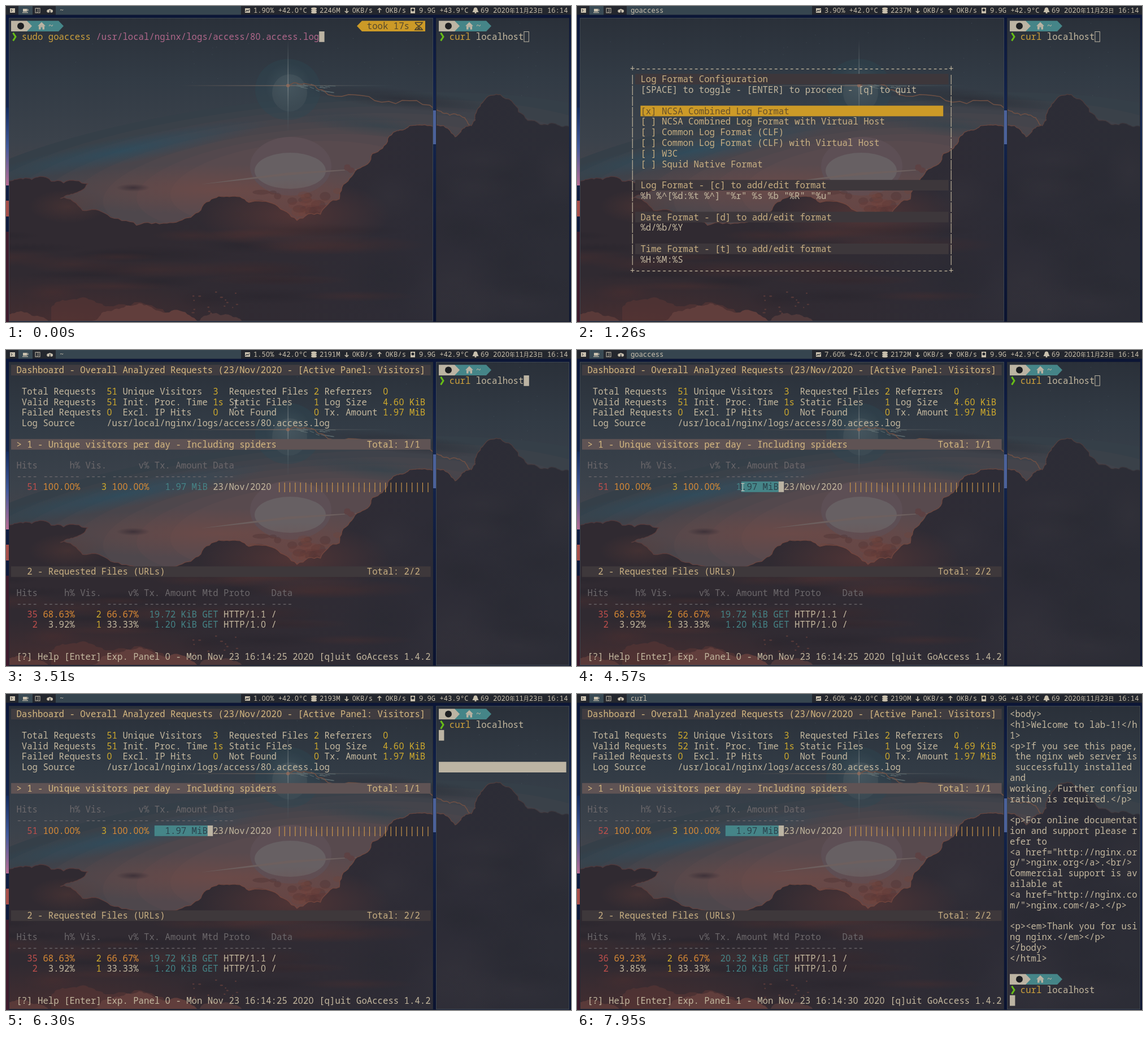
An HTML page with a canvas for the animation above (8 s loop, 1000 by 560 pixels).

```html
<!DOCTYPE html>
<html lang="en">
<head>
<meta charset="utf-8">
<title>Log analyzer session</title>
<style>
html, body { margin: 0; height: 100%; overflow: hidden; background: #0a1433; }
canvas { display: block; width: 100vw; height: 100vh; }
</style>
</head>
<body>
<canvas id="stage" width="1000" height="560"></canvas>
<script>
const LOOP = 8000, CW = 9.4, RH = 18.8, TOP = 26.2, LEFT = 9, RIGHT = 766;
const FG = '#c4b89f', LIGHT = '#bcb4a3', YELLOW = '#cc9a27', TEAL = '#458588', RED = '#bf4f4c', ORANGE = '#d98a35',
  GOLD = '#cfaa2c', GREY = '#6c686b', TITLE = '#d6b981', TAN = '#c9b083', PINK = '#b0678a', CMD = '#cda03c';
let g = document.getElementById('stage').getContext('2d');

// ---------- drawing helpers ----------
function rect(x, y, w, h, color) { g.fillStyle = color; g.fillRect(x, y, w, h); }
function trace(p) {
  g.beginPath();
  p.forEach(([x, y]) => g.lineTo(x, y));
}
function poly(color, ...p) { trace(p); g.fillStyle = color; g.fill(); }
function line(color, width, ...p) {
  trace(p);
  g.strokeStyle = color;
  g.lineWidth = width;
  g.stroke();
}
function oval(x, y, rx, ry, color, turn = 0) {
  g.fillStyle = color;
  g.beginPath();
  g.ellipse(x, y, rx, ry, turn, 0, 7);
  g.fill();
}
function gradient(box, ...colors) {
  const f = box.length > 4 ? g.createRadialGradient(...box) : g.createLinearGradient(...box);
  colors.forEach((c, i) => f.addColorStop(i / (colors.length - 1), c));
  return f;
}
function glow(x, y, rx, ry, rgb, alpha, turn = 0) {
  g.save();
  g.translate(x, y);
  g.rotate(turn);
  g.scale(1, ry / rx);
  oval(0, 0, rx, rx, gradient([0, 0, 0, 0, 0, rx], `rgba(${rgb},${alpha})`, `rgba(${rgb},0)`));
  g.restore();
}
// Monospaced text with an open zero.
function text(s, x, y, color, size = CW / 0.6) {
  g.fillStyle = color;
  [...s].forEach((c, i) => {
    if (c === ' ') return;
    const zero = c === '0';
    g.font = size + (zero ? 'px "Noto Sans", sans-serif' : 'px "Noto Sans Mono", monospace');
    g.fillText(c, x + size * (i * 0.6 + (zero ? 0.014 : 0)), y);
  });
}
const rowY = r => TOP + r * RH;
function put(s, col, row, color = FG, x0 = LEFT) { text(s, x0 + col * CW, rowY(row) + 14.9, color); }
function cells(col, row, n, color, x0 = LEFT) { rect(x0 + col * CW, rowY(row), n * CW, RH, color); }
function cursor(col, row, x0, solid = true) {
  if (solid) return cells(col, row, 1, LIGHT, x0);
  g.strokeStyle = LIGHT;
  g.lineWidth = 1;
  g.strokeRect(x0 + col * CW + 0.5, rowY(row) + 0.5, CW - 1, RH - 1);
}

// ---------- wallpaper ----------
let seed = 7;
const rnd = () => (seed = seed * 16807 % 2147483647) / 2147483647;
const mix = (a, b, k) => `rgb(${a.map((v, i) => v + (b[i] - v) * k)})`;
// Roughens a polyline by repeated midpoint displacement.
function ridge(p, rough = 0.3) {
  for (let round = 0; round < 4; round++) {
    p = p.flatMap(([x, y], i) => {
      if (!i) return [[x, y]];
      const [px, py] = p[i - 1], d = (rnd() - 0.4) * rough;
      return [[(px + x) / 2 + (y - py) * d, (py + y) / 2 - (x - px) * d], [x, y]];
    });
  }
  return p;
}
function cloud(p, fill, rim) {
  const edge = ridge(p);
  poly(fill, ...edge, [p[p.length - 1][0], 560], [p[0][0], 560]);
  if (rim) line(rim, 1.2, ...edge);
}
function paintScene() {
  rect(0, 0, 1000, 560, gradient([0, 20, 0, 350], '#2a3039', '#323b45', '#3b424b', '#4c4549'));
  for (let i = 0; i < 40; i++) rect(rnd() * 1000, 22 + rnd() * 150, 1, 1, '#444e58');
  for (let i = 0; i < 8; i++) oval(510, 315, 640 - 60 * i, 150 - 11 * i, mix([53, 63, 72], [88, 74, 78], i / 7), -0.1);
  glow(210, 256, 260, 24, '40,80,100', 0.65, -0.19);
  glow(660, 212, 160, 20, '48,66,76', 0.6, 0.12);
  glow(380, 325, 340, 45, '118,74,68', 0.6);

  oval(504, 284, 72, 52, '#5d4f55');
  oval(503, 292, 63, 32, '#676063');
  poly('#6d605f', [345, 316], [500, 295], [640, 288], [500, 300]);

  oval(499, 148, 58, 54, 'rgba(44,72,85,.35)');
  oval(502, 154, 31, 33, '#3c4a53');
  glow(499, 141, 40, 40, '90,112,120', 0.3);
  rect(498.5, 60, 1.4, 165, gradient([0, 60, 0, 225], 'rgba(120,128,130,0)', '#777f82', 'rgba(80,100,108,0)'));
  rect(310, 140.5, 380, 1.2, gradient([310, 0, 690, 0], 'rgba(140,115,100,0)', '#806d64', 'rgba(76,96,104,0)'));
  glow(700, 165, 170, 18, '44,46,55', 0.8, 0.1);
  for (let i = 0; i < 18; i++) {
    const x = 510 + rnd() * 60, y = 138 + rnd() * (x - 490) * 0.2;
    line('#5d6c70', 1, [x, y], [x + 6 + rnd() * 12, y + rnd() * 3]);
  }
  line('#6f5044', 1.5, ...ridge([[500, 141], [570, 157], [760, 184], [812, 198], [822, 214], [795, 233]]));
  oval(499, 141, 3, 3, '#8a6a5c');

  for (let i = 0; i < 45; i++) {
    oval(435 + rnd() * 165, 328 + rnd() * 45, 6 + rnd() * 15, 3 + rnd() * 6, i % 2 ? 'rgba(70,47,50,.4)' : 'rgba(112,68,60,.35)');
  }
  for (let i = 0; i < 7; i++) oval(602 + rnd() * 14, 284 + rnd() * 10, 5, 4, '#5d4244');
  glow(225, 322, 30, 7, '62,50,57', 1);
  const ground = [[0, 309], [60, 302], [145, 315], [96, 341], [180, 370], [285, 385], [360, 346], [430, 348], [515, 380], [590, 342],
    [640, 280], [690, 222], [727, 211], [795, 232], [824, 212], [832, 190], [875, 157], [945, 210], [1000, 216]];
  cloud(ground, gradient([0, 0, 1000, 0], '#302a31', '#302a31', '#302b33', '#2d2c36', '#2c2d36'),
    gradient([0, 0, 1000, 0], '#4b363b', '#68443f', '#75493f', '#6b473f', '#33323a'));
  for (let i = 0; i < 28; i++) glow(rnd() * 640, 390 + rnd() * 140, 50 + rnd() * 100, 8 + rnd() * 10, i % 2 ? '38,35,43' : '72,46,47', 0.45);
  for (let i = 0; i < 16; i++) glow(660 + rnd() * 340, 270 + rnd() * 270, 40 + rnd() * 60, 30 + rnd() * 40, i % 2 ? '39,40,48' : '54,52,60', 0.4);
  glow(510, 370, 170, 65, '120,64,56', 0.45);
  glow(110, 355, 70, 30, '96,60,54', 0.4);
  glow(100, 560, 330, 85, '92,50,48', 0.5);
  cloud([[80, 534], [125, 520], [180, 532], [330, 560]], 'rgba(92,56,54,.55)');
  cloud([[0, 549], [35, 543], [75, 560]], '#5a3a39');
  cloud([[150, 560], [200, 537], [270, 540], [340, 560]], '#613e3c');
  cloud([[340, 560], [380, 548], [420, 560]], '#4f393b');
  for (let i = 0; i < 16; i++) oval(330 + rnd() * 80, 505 + rnd() * 40, 1 + rnd() * 2, 1.2, '#563a39');
}
function paintGaps() {
  const night = gradient([0, 15, 0, 560], '#0b1638', '#14264f', '#0f1a3c', '#0b1330');
  rect(0, 15, 1000, 6, '#0c1636');
  rect(0, 559, 1000, 1, '#151a30');
  [0, 756, 997].forEach(x => rect(x, 15, 5, 544, night));
  rect(756, 185, 5, 60, '#4b619a');
  rect(0, 180, 5, 138, gradient([0, 180, 0, 318], '#122a5c', '#41599a', '#b56c93'));
  rect(0, 345, 5, 28, '#a64e4a');
  rect(0, 400, 5, 160, '#3d1b2d');
}

// ---------- status bar ----------
const STATS = ['1.90% 2246M', '3.90% 2237M', '5.20% 2204M', '1.50% 2191M', '7.60% 2172M', '1.00% 2193M', '2.60% 2190M'];
const BAR_FG = '#c9c0ae', BAR_BG = '#24272e';
function arrow(x, dir) {
  line(BAR_FG, 1.6, [x, 8 - 4 * dir], [x, 8 + 4 * dir]);
  line(BAR_FG, 1.6, [x - 3.2, 8 + dir], [x, 8 + 4 * dir], [x + 3.2, 8 + dir]);
}
function bar(t, title) {
  const k = Math.floor((t - 820) / 1237) + 1, [cpu, mem] = STATS[k].split(' ');
  const temp = k > 0 && k < 5 ? '42.9' : '43.9';
  const say = (s, x) => text(s, x, 12.3, BAR_FG, 12.15);
  rect(0, 0, 1000, 15.5, BAR_BG);
  rect(22, 0, 25, 15.5, '#394a54');
  rect(88, 0, 328, 15.5, '#36454f');
  rect(7, 4, 9, 8, BAR_FG);
  line(BAR_BG, 1, [9, 6], [11, 8], [9, 10]);
  rect(30, 5, 7, 5, BAR_FG);
  rect(29, 11, 10, 1.2, BAR_FG);
  line(BAR_FG, 1, [37, 6], [39, 6], [39, 8.5], [37, 8.5]);
  g.strokeRect(52, 4, 8, 8);
  text('3', 53.6, 11, BAR_FG, 8);
  for (let i = 0; i < 3; i++) oval(75 + 2.6 * i, 9 - i % 2, 2.8, 2.8, BAR_FG);
  rect(77, 7.5, 1.4, 4, BAR_BG);
  say(title, 95);

  rect(423, 4, 9, 8, BAR_FG);
  line(BAR_BG, 1.1, [424, 10], [426.5, 7.5], [428.5, 9], [431, 6]);
  say(cpu + ' +42.0°C', 438);
  for (let i = 0; i < 3; i++) oval(545, 4.5 + 3.4 * i, 5, 2, BAR_FG);
  say(mem, 555);
  arrow(603, 1);
  say('0KB/s', 612.5);
  arrow(661, -1);
  say('0KB/s', 671.5);
  rect(716, 3, 8, 10, BAR_FG);
  oval(720, 7, 2.5, 2.5, BAR_BG);
  say(`9.9G +${temp}°C`, 731);
  oval(831, 6, 3.3, 3.6, BAR_FG);
  poly(BAR_FG, [827.7, 6], [834.3, 6], [836.5, 11], [825.5, 11]);
  oval(831, 12, 1.6, 1.3, BAR_FG);
  say('69', 840);
  let x = 862;
  for (const part of ['2020', '年', '11', '月', '23', '日']) {
    if (part < 'a') { say(part, x); x += part.length * 7.29; continue; }
    g.font = '10px "Noto Sans CJK JP", "Noto Sans CJK SC", sans-serif';
    g.fillText(part, x, 12);
    x += 10;
  }
  say('16:14', 958);
}

// ---------- shell ----------
function flag(color, x, y, w) { poly(color, [x, y], [x + w, y], [x + w + 9, y + RH / 2], [x + w, y + RH], [x, y + RH]); }
function prompt(x, row) {
  const y = rowY(row), m = y + RH / 2;
  flag(TEAL, x + 28, y, 56);
  flag(LIGHT, x, y, 28);
  oval(x + 17, m, 6, 6, '#1d1f22');
  poly(LIGHT, [x + 47, m], [x + 54, m - 7], [x + 61, m]);
  rect(x + 49, m, 3.5, 6, LIGHT);
  rect(x + 55.5, m, 3.5, 6, LIGHT);
  rect(x + 49, m, 10, 2, LIGHT);
  put('~', 7, row, LIGHT, x);
  line('#67bd17', 3, [x + 3.5, m + 12], [x + 8, m + 19], [x + 3.5, m + 26]);
}
function curl(row) {
  put('curl', 2, row, CMD, RIGHT);
  put('localhost', 7, row, FG, RIGHT);
}
const LOG = '/usr/local/nginx/logs/access/80.access.log';
function shell(entered) {
  const y = rowY(0), ink = '#4b412c';
  prompt(LEFT, 0);
  poly(YELLOW, [621, y + RH / 2], [630, y], [742, y], [742, y + RH], [630, y + RH]);
  put('took 17s', 67, 0, '#54482e');
  line(ink, 1.6, [724, y + 3], [737, y + 3], [735, y + 6], [726, y + 13], [724, y + 16], [737, y + 16], [735, y + 13], [726, y + 6], [724, y + 3]);
  poly(ink, [727, y + 15], [730.5, y + 11], [734, y + 15]);
  put('sudo goaccess', 2, 1, CMD);
  put(LOG, 16, 1, PINK);
  if (entered) cursor(0, 2, LEFT);
  else cursor(58, 1, LEFT);
}

// ---------- log format form ----------
const FORMATS = ['NCSA Combined Log Format', 'NCSA Combined Log Format with Virtual Host', 'Common Log Format (CLF)',
  'Common Log Format (CLF) with Virtual Host', 'W3C', 'Squid Native Format'];
const FIELDS = [['Log Format - [c]', '%h %^[%d:%t %^] "%r" %s %b "%R" "%u"'], ['Date Format - [d]', '%d/%b/%Y'],
  ['Time Format - [t]', '%H:%M:%S']];
function form(picked) {
  const rule = '+' + '-'.repeat(59) + '+';
  put(rule, 9, 4);
  put(rule, 9, 23);
  for (let r = 5; r < 23; r++) put('|' + ' '.repeat(59) + '|', 9, r);
  const head = (s, r) => { cells(10, r, 59, '#3d373b'); put(s, 11, r, TAN); };
  head('Log Format Configuration', 5);
  put('[SPACE] to toggle - [ENTER] to proceed - [q] to quit', 11, 6);
  cells(11, 8, 57, YELLOW);
  FORMATS.forEach((s, i) => put((i || !picked ? '[ ] ' : '[x] ') + s, 11, 8 + i, i ? TAN : '#66502b'));
  FIELDS.forEach(([name, value], i) => {
    head(name + ' to add/edit format', 15 + 3 * i);
    if (picked) put(value, 11, 16 + 3 * i);
  });
}

// ---------- dashboard ----------
// Each stat column: label column, value column, then label and value per row.
const summary = (n, size) => [
  [2, 18, 'Total Requests', n, 'Valid Requests', n, 'Failed Requests', '0'],
  [21, 38, 'Unique Visitors', '3', 'Init. Proc. Time', '1s', 'Excl. IP Hits', '0'],
  [41, 57, 'Requested Files', '2', 'Static Files', '1', 'Not Found', '0'],
  [59, 70, 'Referrers', '0', 'Log Size', size, 'Tx. Amount', '1.97 MiB']];
function panel(row, title, total, color, back, heads, rules) {
  cells(0, row, 79, back);
  put(title, 1, row, color);
  put('Total: ' + total, 67, row, color);
  put(heads, 1, row + 2, GREY);
  put(rules, 1, row + 3, GREY);
}
function request(row, hits, share, visits, part, color, size, proto) {
  put(hits, 3, row, RED);
  put(share, 6, row, color);
  put(visits, 16, row, GOLD);
  put(part, 18, row, color);
  put(size + ' GET', 26, row, TEAL);
  put(proto + ' /', 40, row);
}
function dashboard(late, selected) {
  const n = late ? '52' : '51';
  cells(0, 0, 79, '#403c40');
  put('Dashboard - Overall Analyzed Requests (23/Nov/2020 - [Active Panel: Visitors]', 1, 0, TITLE);
  for (const [labelCol, valueCol, ...items] of summary(n, late ? '4.69 KiB' : '4.60 KiB')) {
    items.forEach((s, i) => put(s, i % 2 ? valueCol : labelCol, 2 + (i >> 1), i % 2 ? GOLD : FG));
  }
  put('Log Source', 2, 5);
  put(LOG, 18, 5);

  panel(7, '> 1 - Unique visitors per day - Including spiders', '1/1', TITLE, '#5f5354',
    'Hits      h% Vis.      v% Tx. Amount Data', '---- ------- ---- ------- ---------- ----');
  put(n, 3, 11, RED);
  put('100.00%', 6, 11, ORANGE);
  put('3', 17, 11, GOLD);
  put('100.00%', 19, 11, ORANGE);
  const size = '  1.97 MiB', cut = 10 - selected;
  put(size.slice(0, cut), 27, 11, TEAL);
  if (selected >= 0) {
    cells(27 + cut, 11, selected, TEAL);
    put(size.slice(cut), 27 + cut, 11, '#2b414b');
    cursor(37, 11, LEFT);
  }
  put('23/Nov/2020', 38, 11);
  put('|'.repeat(29), 50, 11, '#cf9a4c');

  panel(19, '  2 - Requested Files (URLs)', '2/2', TAN, '#3e383b',
    'Hits     h% Vis.     v% Tx. Amount Mtd Proto    Data', '---- ------ ---- ------ ---------- --- -------- ----');
  request(23, late ? '36' : '35', late ? '69.23%' : '68.63%', '2', '66.67%', ORANGE, late ? '20.32 KiB' : '19.72 KiB', 'HTTP/1.1');
  request(24, ' 2', late ? ' 3.85%' : ' 3.92%', '1', '33.33%', FG, ' 1.20 KiB', 'HTTP/1.0');
  put(`[?] Help [Enter] Exp. Panel ${late ? 1 : 0} - Mon Nov 23 16:14:${late ? 30 : 25} 2020 [q]uit GoAccess 1.4.2`, 1, 27);
}

// ---------- right terminal ----------
const PAGE = `</head>
<body>
<h1>Welcome to lab-1!</h1>
<p>If you see this page, the nginx web server is successfully installed 
and
working. Further configuration is required.</p>

<p>For online documentation and support please refer to
<a href="http://nginx.org/">nginx.org</a>.<br/>
Commercial support is available at
<a href="http://nginx.com/">nginx.com</a>.</p>

<p><em>Thank you for using nginx.</em></p>
</body>
</html>`.split('\n').flatMap(s => s.match(/.{1,24}/g) || ['']);
function client(t, focused) {
  if (t < 6390) {
    prompt(RIGHT, 0);
    curl(1);
    if (t >= 5410) cells(0, 5, 24, LIGHT, RIGHT);
    if (t < 6260) cursor(16, 1, RIGHT, focused);
    else cursor(0, 2, RIGHT);
    return;
  }
  const up = t >= 7910 ? 1 : 0;
  PAGE.slice(up).forEach((s, r) => put(s, 0, r, FG, RIGHT));
  prompt(RIGHT, 26 - up);
  if (t >= 7120) curl(27 - up);
  cursor(up ? 0 : t >= 7120 ? 16 : 2, 27, RIGHT);
}

// ---------- pointer ----------
const part = (t, from, to) => Math.min(1, Math.max(0, (t - from) / (to - from)));
const bezier = (u, a, b, c, d) => (1 - u) ** 3 * a + 3 * (1 - u) ** 2 * u * b + 3 * (1 - u) * u * u * c + u ** 3 * d;
function pointer(t) {
  const come = part(t, 3250, 4040), drag = part(t, 4080, 4810), k = part(t, 4910, 5290), leave = k * k * (3 - 2 * k);
  return [bezier(come, 632, 300, 320, 362) - 102 * drag + 620 * leave, bezier(come, 40, 2, 340, 243) - 113 * leave];
}
function ibeam(x, y) {
  line('#cfcac0', 1, [x, y - 6], [x, y + 6]);
  for (const end of [y - 6.5, y + 6.5]) line('#cfcac0', 1, [x - 3, end], [x + 3, end]);
}

// ---------- timeline ----------
function titleAt(t) {
  if (t >= 7950 || (t >= 6330 && t < 6430)) return 'curl';
  return (t >= 870 && t < 2510) || (t >= 4080 && t < 5330) ? 'goaccess' : '~';
}
const wall = document.createElement('canvas');
wall.width = 1000;
wall.height = 560;

function border(x, w, focused) {
  g.lineWidth = 1;
  g.strokeStyle = focused ? '#3d4650' : '#262b35';
  g.strokeRect(x + 0.5, 21.5, w, 537);
}
function draw(t) {
  const rightFocus = t >= 5290 || (t >= 2450 && t < 4080);
  const [mx, my] = pointer(t);
  g.drawImage(wall, 0, 0);
  border(5, 750, !rightFocus);
  border(761, 235, rightFocus);
  bar(t, titleAt(t));
  if (t < 890) shell(t >= 810);
  else if (t >= 980 && t < 1520) form(t >= 1260);
  else if (t >= 1520) {
    const from = t < 4810 ? Math.floor((mx - LEFT) / CW) : 27;
    dashboard(t >= 6470, t < 4080 ? -1 : 37 - Math.min(37, Math.max(27, from)));
  }
  client(t, rightFocus);
  if (t >= 3250 && t < 5410) ibeam(mx, my);
}

const screen2d = g;
g = wall.getContext('2d');
paintScene();
paintGaps();
g = screen2d;

const start = performance.now();
function tick() {
  draw((performance.now() - start) % LOOP);
  requestAnimationFrame(tick);
}
tick();
</script>
</body>
</html>
```
